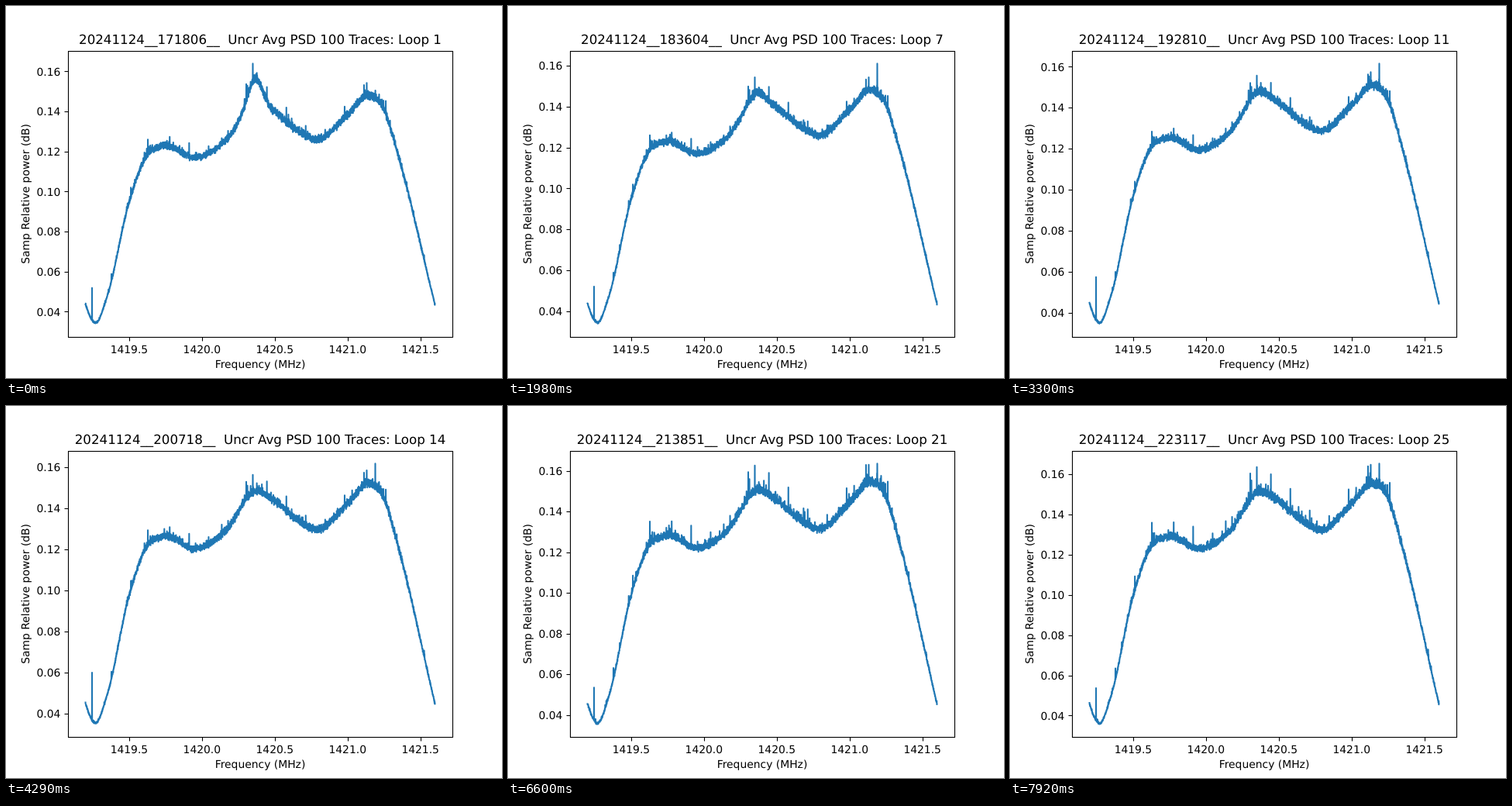
These frames come from a looping animation (640 by 480 pixels, 8000 ms). An HTML page:

```html
<!DOCTYPE html>
<html lang="en">
<head>
<meta charset="utf-8">
<title>Averaged spectrum</title>
<style>
  html, body { margin: 0; width: 100%; height: 100%; overflow: hidden; background: #fff; }
  svg { display: block; width: 640px; height: 480px; }
  text { font: 13.889px "DejaVu Sans", sans-serif; text-rendering: geometricPrecision; white-space: pre; text-anchor: middle; }
  #title { font-size: 16.667px; }
  #yTicks text { text-anchor: end; }
  .axis { fill: none; stroke: #000; stroke-width: 1.11; }
  #trace { fill: none; stroke: #1f77b4; stroke-width: 2.083; stroke-linejoin: round; stroke-linecap: square; }
</style>
</head>
<body>
<svg viewBox="0 0 640 480">
  <g id="xTicks"></g>
  <g id="yTicks"></g>
  <path id="trace"/>
  <rect class="axis" x="80.5" y="58.5" width="496" height="369"/>
  <text id="title" x="328" y="49"></text>
  <text x="328" y="467">Frequency (MHz)</text>
  <text transform="translate(30 242.4) rotate(-90)">Samp Relative power (dB)</text>
</svg>
<script>
const STEP = 330, CYCLE = 8000, LOOPS = 25, SAMPLES = 4096;
const LEFT = 102.55, WIDTH = 450.9, BOTTOM = 410.4, HEIGHT = 336;
const BURST = 23, START = 62286;

// smooth passband: x in pixels, power in thousandths
const BAND = [
  [102.5, 43.8], [108, 38], [115.5, 34.4], [130, 47], [159, 95], [180, 117],
  [203, 122.8], [245, 117], [285, 126], [319, 143.8], [345, 140], [375, 130.8],
  [403, 126], [440, 138], [470, 148], [488, 140.8], [505, 119.5], [553.5, 43.4]
];
// highest power by loop
const PEAK = [[1, .1639], [7, .161], [18, .1622], [25, .1652]];
// strong carriers: x, height in thousandths
const CARRIERS = [[183, 8], [310, 9], [318.5, 9], [465.5, 7], [490, 7]];

const byId = id => document.getElementById(id);
const clamp = (v, lo, hi) => Math.min(hi, Math.max(lo, v));
const crisp = v => Math.floor(v + .5) + .5;
const bell = (x, center, width) => Math.exp(-(((x - center) / width) ** 2) / 2);

function random(seed) {
  return () => {
    seed = seed + 0x6D2B79F5 | 0;
    let t = Math.imul(seed ^ seed >>> 15, 1 | seed);
    t = t + Math.imul(t ^ t >>> 7, 61 | t) ^ t;
    return ((t ^ t >>> 14) >>> 0) / 4294967296;
  };
}

function segment(points, x) {
  let i = 0;
  while (i < points.length - 2 && points[i + 1][0] < x) i++;
  const [x0, y0] = points[i], [x1, y1] = points[i + 1];
  return { i, y0, y1, w: x1 - x0, u: (x - x0) / (x1 - x0) };
}

function linear(points, x) {
  const { y0, y1, u } = segment(points, x);
  return y0 + (y1 - y0) * u;
}

function slope(points, i) {
  const rate = k => (points[k + 1][1] - points[k][1]) / (points[k + 1][0] - points[k][0]);
  if (i === 0) return rate(0);
  if (i === points.length - 1) return rate(i - 1);
  const before = points[i][0] - points[i - 1][0], after = points[i + 1][0] - points[i][0];
  return (after * rate(i - 1) + before * rate(i)) / (before + after);
}

function smooth(points, x) {
  const { i, y0, y1, w, u } = segment(points, x), v = 1 - u;
  return v * v * (1 + 2 * u) * y0 + u * u * (3 - 2 * u) * y1
    + w * u * v * (v * slope(points, i) - u * slope(points, i + 1));
}

const xs = Array.from({ length: SAMPLES }, (_, i) => LEFT + WIDTH * i / (SAMPLES - 1));
const band = xs.map(x => smooth(BAND, x) / 1000);
const indexAt = x => Math.round((x - LEFT) / WIDTH * (SAMPLES - 1));

// interference stays on the same channels in every loop
const pick = random(41);
const clutter = xs.map(() => pick() < .12 ? -Math.log(1 - pick()) : 0);
const harmonics = Array.from({ length: 15 }, (_, k) => [111 + 25.07 * (k + 1), 3 + 5 * pick()]);

function spectrum(n) {
  const rise = clamp((n - 7) / 18, 0, 1) ** .6;
  const early = Math.exp((1 - n) / 4);
  const activity = n === BURST ? 1.8 : .9 + .5 * clamp((n - 14) / 4, 0, 1);
  const lo = .0336 + .0022 * rise + .0002 * early;
  const hi = n === BURST ? .1751 : linear(PEAK, n);
  const rand = random(n * 977);

  const clean = band.map((v, i) => v * (1 + .05 * rise) + .012 * early * bell(xs[i], 322, 9));
  const values = clean.map(v => v + (rand() + rand() + rand() - 1.5) * .013 * v)
    .map((v, i) => v + clutter[i] * activity * (.5 + .5 * rand()) * .0085 * v)
    .map(v => clamp(v, lo, hi - .001));

  const spike = (x, height) => {
    const i = indexAt(x);
    values[i] = Math.min(hi - .0005, clean[i] + height / 1000);
  };
  spike(111, 16 + 8 * bell(n, 13, 2));
  for (const [x, height] of [...harmonics, ...CARRIERS]) spike(x, height * activity);
  values[indexAt(n === BURST ? 481.5 : n < 4 ? 318.5 : 476.5)] = hi;
  return { lo, hi, values };
}

function stamp(n) {
  const k = n - 1, seconds = Math.round(START + 778.575 * k + .1825 * k * k);
  return [seconds / 3600, seconds / 60 % 60, seconds % 60]
    .map(v => String(Math.floor(v)).padStart(2, "0")).join("");
}

function draw(n) {
  const { lo, hi, values } = spectrum(n);
  const toY = v => BOTTOM - (v - lo) / (hi - lo) * HEIGHT;
  byId("title").textContent = `20241124__${stamp(n)}__  Uncr Avg PSD 100 Traces: Loop ${n}`;
  byId("trace").setAttribute("d",
    "M" + values.map((v, i) => xs[i].toFixed(2) + " " + toY(v).toFixed(2)).join("L"));
  let ticks = "";
  for (let k = 4; toY(k / 100) > 57.6; k += 2) {
    const y = toY(k / 100);
    ticks += `<path class="axis" d="M80.5 ${crisp(y)}h-5"/>`
      + `<text x="70.3" y="${Math.round(y + 5.3)}">${(k / 100).toFixed(2)}</text>`;
  }
  byId("yTicks").innerHTML = ticks;
}

byId("xTicks").innerHTML = [1419.5, 1420, 1420.5, 1421, 1421.5].map(f => {
  const x = LEFT + (f - 1419.2) / 2.4 * WIDTH;
  return `<path class="axis" d="M${crisp(x)} 427.5v5"/><text x="${x}" y="448">${f.toFixed(1)}</text>`;
}).join("");

let shown = 0;
function tick() {
  const n = Math.min(LOOPS, Math.floor(performance.now() % CYCLE / STEP) + 1);
  if (n !== shown) draw(shown = n);
  requestAnimationFrame(tick);
}
tick();
</script>
</body>
</html>
```
